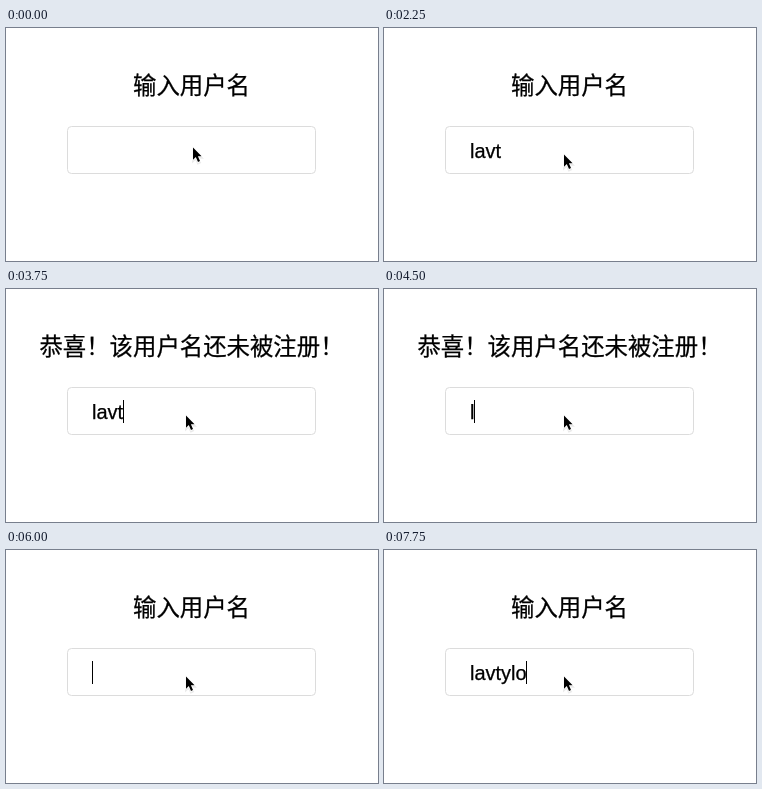
Write an HTML page that moves like this. It is 372x233 px and loops after 8000 ms.

```html
<!DOCTYPE html>
<html lang="zh-CN">
<head>
<meta charset="utf-8">
<title>输入用户名</title>
<style>
  html, body { margin: 0; width: 100%; height: 100%; overflow: hidden; background: #fff; }
  svg { display: block; }
  text { fill: #000; stroke: #000; stroke-width: .25; }
  #title { font: 23.4px "Noto Sans CJK SC", "Noto Sans CJK", sans-serif; text-anchor: middle; }
  #entry { font: 20px "Liberation Sans", Arial, sans-serif; }
</style>
</head>
<body>
<svg width="372" height="233" viewBox="0 0 372 233">
  <defs>
    <path id="arrow" d="M0 0V12.2L2.8 9.6 5 14.4 7 13.5 4.9 8.8H8.6Z"/>
  </defs>
  <text id="title" x="185.5" y="66"></text>
  <rect x="61.5" y="98.5" width="248" height="47" rx="4" fill="#fff" stroke="#dcdcdc"/>
  <text id="entry" x="86" y="130"></text>
  <rect id="caret" y="111" width="1" height="23"/>
  <g id="pointer">
    <use href="#arrow" y="1.5" stroke="#000" stroke-width="2" opacity=".08"/>
    <use href="#arrow" stroke="#fff" stroke-width="1.6" stroke-linejoin="round" paint-order="stroke"/>
  </g>
</svg>
<script>
  const BEAT = 250, BEATS = 32, BLINK = 4;
  const NAME = "lavtylo";
  const PROMPT = "输入用户名";
  const SUCCESS = "恭喜！该用户名还未被注册！";

  // Each phase begins at a beat; the caret starts to blink after its last key.
  const phases = [
    { from: 0, lastKey: 1, letters: () => 0 },
    { from: 5, lastKey: 7, letters: b => Math.min(4, b - 3) },
    { from: 17, lastKey: 20, letters: b => Math.max(0, 37 - 2 * b) },
    { from: 24, lastKey: BEATS, letters: b => b - 24 }
  ];

  const [title, entry, caret, pointer] =
    ["title", "entry", "caret", "pointer"].map(id => document.getElementById(id));
  let shown = -1;

  function show(beat) {
    const phase = phases.findLast(p => p.from <= beat);
    const count = phase.letters(beat);
    const idle = Math.max(0, beat - phase.lastKey);
    const focused = beat >= 2;
    const lit = focused && idle % BLINK < BLINK / 2;

    title.textContent = beat >= 11 && beat < 24 ? SUCCESS : PROMPT;
    entry.textContent = NAME.slice(0, count);
    const width = count ? entry.getComputedTextLength() : 0;
    caret.setAttribute("x", Math.floor(86 + width));
    caret.setAttribute("visibility", lit ? "visible" : "hidden");
    pointer.setAttribute("transform", beat ? "translate(180 126.5)" : "translate(187 119.5)");
  }

  const origin = performance.now();

  function tick() {
    const time = Math.max(0, performance.now() - origin);
    const beat = Math.floor(time / BEAT) % BEATS;
    if (beat !== shown) show(shown = beat);
    requestAnimationFrame(tick);
  }
  tick();
</script>
</body>
</html>
```
